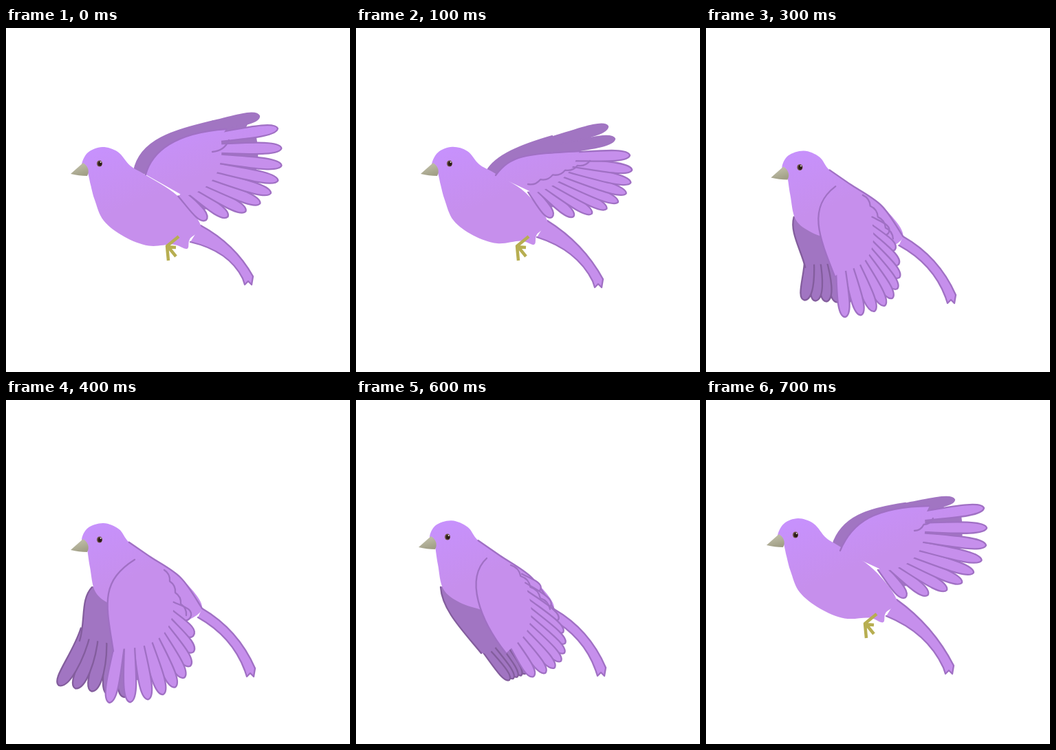
Animation, 500 px wide and 500 px high, one loop 800 ms. Source, as an HTML page:

```html
<!DOCTYPE html>
<html lang="en">
<head>
<meta charset="utf-8">
<title>Flying bird</title>
<style>
html, body { margin: 0; width: 100%; height: 100%; overflow: hidden; background: #fff; }
svg { display: block; width: 100%; height: 100%; }
path { stroke-width: 2.3; stroke-linejoin: round; stroke-linecap: round; }
</style>
</head>
<body>
<svg viewBox="0 0 500 500">
  <defs>
    <linearGradient id="plume" gradientUnits="userSpaceOnUse" x1="130" y1="180" x2="165" y2="265">
      <stop offset="0" stop-color="#c791fc"/>
      <stop offset="1" stop-color="#c68fec"/>
    </linearGradient>
    <linearGradient id="horn" x1="0.2" y1="0" x2="0.6" y2="1">
      <stop offset="0" stop-color="#c6c5af"/>
      <stop offset="1" stop-color="#a09e85"/>
    </linearGradient>
  </defs>
  <g id="bird"></g>
  <path id="foot" fill="none" stroke="#b7ae51" style="stroke-width:4.5;stroke-linecap:butt"
    d="M251,303L234,317L236,338M234,316L247,332M235,318L247,319"/>
  <g id="face">
    <path fill="url(#horn)" d="M-24,-1L-42,15C-34,17 -26,18 -18,18C-14,11 -17,3 -24,-1Z"/>
    <ellipse rx="4" ry="4.5" fill="#67503f"/>
    <ellipse cx="0.6" cy="0.2" rx="2.7" ry="3.2" fill="#2a1a18"/>
    <circle cx="1.6" cy="-2" r="1" fill="#f4eef5"/>
  </g>
</svg>
<script>
const LIGHT = "url(#plume)", DARK = "#a175c2", RIM = "#a070c4", DEEP = "#835d9d";
const STEP = 100;

// Body outlines start at the beak and run over the back to the rump.
const flyingBody = {
  eye: [136, 197], rump: [284, 286],
  outline: [[110, 199], [119, 181], [140, 173], [163, 180], [181, 200], [203, 213], [250, 243],
    [284, 286], [268, 306], [264, 320], [244, 314], [208, 316], [172, 303], [142, 280],
    [129, 250], [123, 228], [118, 208]]
};
const divingBody = {
  eye: [137, 202], rump: [290, 303],
  outline: [[111, 202], [120, 185], [143, 178], [166, 187], [181, 206], [212, 227], [258, 258],
    [290, 303], [245, 325], [190, 308], [155, 297], [131, 278], [123, 242], [118, 212]]
};

// A wing has a leading edge (one cubic) and n feathers between two curves,
// each given by a few points from the trailing to the leading feather.
const raised = {
  eye: [136, 197], rump: [283, 287], foot: [0, 0], ripple: [[324, 163], [300, 180]],
  far: { n: 2, w: 16, lead: [[186, 208], [195, 160], [250, 148], [302, 135]],
    roots: [[300, 150], [300, 142]], tips: [[350, 138], [368, 128]] },
  near: { n: 9, w: 17, lead: [[203, 213], [212, 180], [245, 152], [320, 147]],
    roots: [[255, 240], [292, 212], [300, 160]], tips: [[291, 279], [385, 240], [395, 146]] }
};
const level = {
  eye: [136, 197], rump: [278, 280], foot: [0, 0], ripple: [[340, 193], [250, 227]],
  far: { n: 2, w: 16, lead: [[190, 208], [203, 185], [240, 170], [285, 157]],
    roots: [[285, 178], [285, 165]], tips: [[376, 161], [366, 143]] },
  near: { n: 9, w: 16, lead: [[203, 214], [225, 185], [245, 183], [325, 179]],
    roots: [[255, 235], [288, 214], [310, 187]], tips: [[285, 275], [381, 253], [398, 185]] }
};
const rising = {
  eye: [130, 196], rump: [277, 290], foot: [-3, 8], ripple: [[330, 172], [303, 190]],
  far: { n: 2, w: 14, lead: [[184, 211], [197, 170], [235, 158], [290, 150]],
    roots: [[290, 162], [290, 156]], tips: [[345, 154], [361, 145]] },
  near: { n: 9, w: 17, lead: [[195, 219], [212, 178], [245, 155], [325, 154]],
    roots: [[255, 243], [295, 220], [305, 170]], tips: [[290, 287], [389, 251], [404, 157]] }
};
const falling = {
  eye: [137, 202], rump: [288, 303], ripple: [[225, 238], [284, 298]],
  far: { n: 5, w: 14, bend: 0, lead: [[131, 278], [138, 305], [165, 325], [190, 345]],
    roots: [[215, 320], [192, 338]], tips: [[250, 360], [224, 372]] },
  near: { n: 10, w: 16, lead: [[190, 228], [163, 256], [185, 305], [225, 356]],
    roots: [[235, 256], [247, 307], [231, 338]], tips: [[262, 276], [302, 356], [266, 396]] }
};
const lowered = {
  eye: [136, 203], rump: [285, 303], ripple: [[230, 247], [262, 313]],
  far: { n: 5, w: 21, bend: -0.35, lead: [[125, 272], [108, 290], [116, 320], [107, 350]],
    roots: [[160, 345], [116, 335]], tips: [[172, 432], [77, 415]] },
  near: { n: 10, w: 19, lead: [[187, 232], [135, 265], [146, 300], [156, 365]],
    roots: [[240, 300], [216, 338], [166, 350]], tips: [[268, 316], [253, 411], [150, 440]] }
};
const lifting = {
  eye: [133, 199], rump: [288, 304], ripple: [[225, 240], [282, 304]],
  far: { n: 5, w: 13, bend: 0, lead: [[123, 272], [125, 305], [155, 335], [182, 368]],
    roots: [[212, 340], [188, 363]], tips: [[246, 398], [223, 407]] },
  near: { n: 10, w: 16, lead: [[190, 230], [158, 260], [180, 320], [218, 368]],
    roots: [[238, 258], [247, 310], [226, 350]], tips: [[268, 276], [304, 361], [258, 402]] }
};

// Blends numbers, arrays and objects of the same form.
function mix(a, b, t) {
  if (typeof a === "number") return a + (b - a) * t;
  if (Array.isArray(a)) return a.map((v, i) => mix(v, b[i], t));
  return Object.fromEntries(Object.keys(a).map(k => [k, mix(a[k], b[k], t)]));
}

const poses = [raised, level, falling, mix(falling, lowered, 0.55), lowered,
  mix(lowered, lifting, 0.45), lifting, rising];

const add = ([x, y], dx, dy) => [x + dx, y + dy];
const str = (...points) => points.map(p => p.map(v => v.toFixed(1)).join()).join(" ");
const path = (d, fill, stroke = "none") => `<path d="${d}" fill="${fill}" stroke="${stroke}"/>`;

// Point at t on the polynomial through evenly spaced points.
function along(points, t) {
  const s = t * (points.length - 1);
  let p = [0, 0];
  points.forEach(([x, y], i) => {
    let k = 1;
    for (let j = 0; j < points.length; j++) if (j !== i) k *= (s - j) / (i - j);
    p = add(p, x * k, y * k);
  });
  return p;
}

function spline(points, closed) {
  const n = points.length;
  const get = i => points[closed ? (i + n) % n : Math.min(n - 1, Math.max(0, i))];
  let d = "M" + str(points[0]);
  for (let i = 0; i < (closed ? n : n - 1); i++) {
    const [a, b, c, e] = [-1, 0, 1, 2].map(k => get(i + k));
    d += "C" + str(add(b, (c[0] - a[0]) / 6, (c[1] - a[1]) / 6),
      add(c, (b[0] - e[0]) / 6, (b[1] - e[1]) / 6), c);
  }
  return d;
}

function feather([x, y], tip, w, bend) {
  const dx = tip[0] - x, dy = tip[1] - y, k = w / Math.hypot(dx, dy);
  const at = (t, s) => [x + dx * t - dy * s * k, y + dy * t + dx * s * k];
  return "M" + str(at(0, 0.38)) + "C" + str(at(0.45, 0.44 + bend), at(0.97, 0.72), at(1, 0)) +
    "C" + str(at(0.97, -0.72), at(0.45, bend - 0.44), at(0, -0.38));
}

function wing({ n, w, bend = 0, lead, roots, tips }, heel, fill, rim) {
  const quills = Array.from({ length: n }, (_, i) =>
    [along(roots, i / (n - 1)), along(tips, i / (n - 1))]);
  const row = t => quills.map(([root, tip]) => mix(root, tip, t)).reverse();
  const front = "M" + str(lead[0]) + "C" + str(...lead.slice(1));
  return path("M" + str(...row(0.66), ...row(0).reverse()) + "Z", DARK) +
    quills.map(([root, tip]) => path(feather(root, tip, w, bend), fill, rim)).join("") +
    path(front + "L" + str(...row(0.13), heel) + "Z", fill) + path(front, "none", rim);
}

function ripple([a, b]) {
  const dx = b[0] - a[0], dy = b[1] - a[1];
  const n = Math.round(Math.hypot(dx, dy) / 20), bulge = 0.3 / n;
  let d = "M" + str(a);
  for (let i = 0; i < n; i++) {
    const mid = mix(a, b, (i + 0.5) / n);
    d += "Q" + str(add(mid, dy * bulge, -dx * bulge), mix(a, b, (i + 1) / n));
  }
  return d;
}

function tail(top, bottom, tip) {
  const mid = add(mix(mix(top, bottom, 0.5), add(tip, 0, -10), 0.5), 14, -12);
  return "M" + str(top) + "Q" + str(add(mid, 5, -5), add(tip, 7, -12)) +
    "L" + str(add(tip, 5, 0), add(tip, 0, -5), add(tip, -5, 0), add(tip, -8, -9)) +
    "Q" + str(add(mid, -4, 5), bottom);
}

// Shifts the outline so that its eye and rump meet those of the pose.
function place({ eye, rump, outline }, pose) {
  return outline.map(p => {
    const u = Math.min(1, Math.max(0, (p[0] - eye[0]) / (rump[0] - eye[0])));
    const [dx, dy] = [0, 1].map(i => mix(pose.eye[i] - eye[i], pose.rump[i] - rump[i], u));
    return add(p, dx, dy);
  });
}

const el = id => document.getElementById(id);
const tailTips = [[352, 373], [352, 377], [357, 398], [356, 400], [355, 402], [355, 402], [356, 401], [353, 398]];

function draw(step) {
  const pose = poses[step], { far, near, eye, rump, foot } = pose;
  const body = place(foot ? flyingBody : divingBody, pose);
  const under = foot ? add(rump, -15, 24) : add(rump, -6, 13);
  const shoulder = near.lead[0];
  el("bird").innerHTML =
    wing(far, shoulder, DARK, foot ? DARK : DEEP) +
    path(tail(rump, under, tailTips[step]), LIGHT, RIM) +
    path(spline(body, true) + "Z", LIGHT) +
    (foot ? "" : path(spline(body.slice(4, 8)), "none", RIM)) +
    wing(near, shoulder, LIGHT, RIM) +
    path(ripple(pose.ripple), "none", RIM);
  el("face").setAttribute("transform", `translate(${eye})`);
  el("foot").setAttribute("visibility", foot ? "visible" : "hidden");
  el("foot").setAttribute("transform", `translate(${foot || [0, 0]})`);
}

let shown = -1;
const start = performance.now();
function tick() {
  const step = Math.floor((performance.now() - start) / STEP) % poses.length;
  if (step !== shown) draw(shown = step);
  requestAnimationFrame(tick);
}
tick();
</script>
</body>
</html>
```
